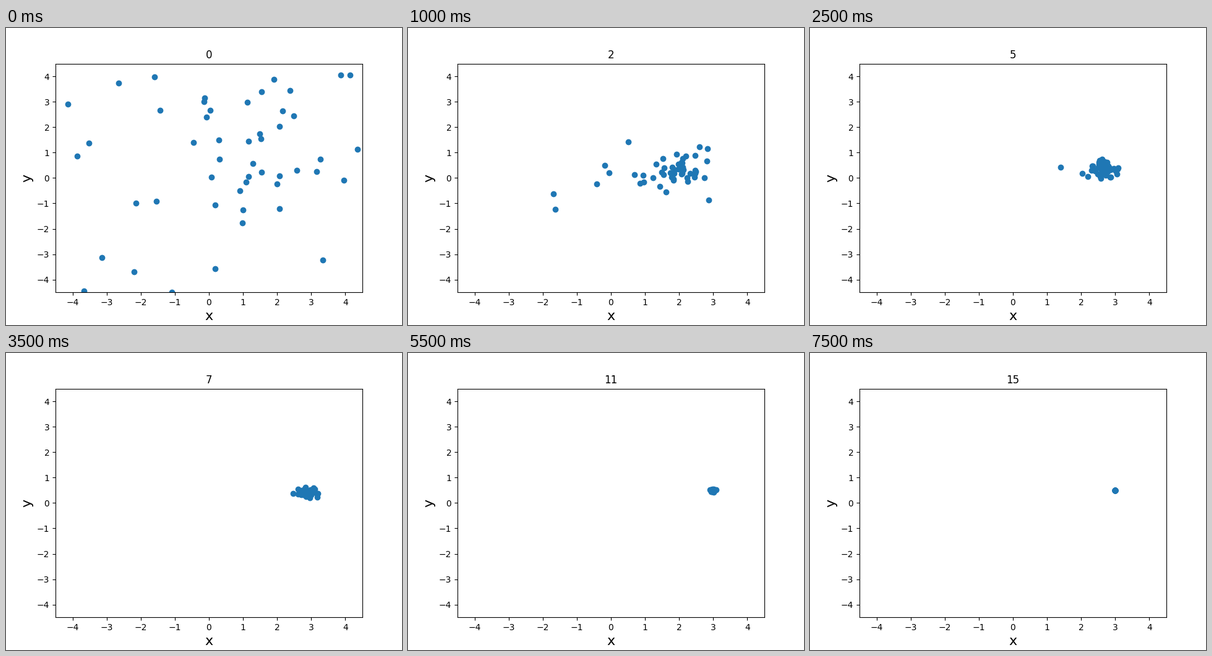
A matplotlib script that plays this animation: 640x480 px, repeating every 8 s.

```python
import numpy as np
import matplotlib.pyplot as plt
from matplotlib.animation import FuncAnimation

W, H, DPI = 640, 480, 100
LIMIT = 4.5
COUNT = 50
STEPS = 16

# Stage positions in pixels
BEST = np.array([442, 239])
OPTIMUM = np.array([493, 222])
RIM = np.array([
    (100, 123), (134, 186), (115, 207), (182, 89), (240, 79), (320, 119),
    (433, 83), (541, 76), (556, 76), (568, 196), (546, 246), (512, 375),
    (338, 389), (268, 427), (207, 394), (155, 371), (126, 425)])

rng = np.random.default_rng(7)
inner = COUNT - len(RIM) - 1
fill = np.c_[rng.triangular(190, 430, 520, inner), rng.uniform(100, 320, inner)]
start = np.vstack([BEST, RIM, fill])

# Each particle is pulled in at its own pace, faster along y than along x
pace = rng.uniform((0.12, 0.35), (0.95, 1.05), (COUNT, 2))
wobble = rng.normal(0, (24, 15), (STEPS, COUNT, 2))


def positions(step):
    """Swarm contracting onto a best point that itself moves to the optimum."""
    center = OPTIMUM + (BEST - OPTIMUM) * np.exp(-(step / 4.8) ** 2)
    pull = np.exp(-pace * step ** 1.5)
    unrest = (1 - np.exp(-step)) * (1 - step / (STEPS - 1)) ** 2
    return center + (start - BEST) * pull + wobble[step] * unrest


fig, ax = plt.subplots(figsize=(W / DPI, H / DPI), dpi=DPI)
ax.set_xlim(-LIMIT, LIMIT)
ax.set_ylim(-LIMIT, LIMIT)
ax.set_xlabel("x", fontsize=16)
ax.set_ylabel("y", fontsize=16)
title = ax.set_title("0")
dots = ax.scatter([], [], color="tab:blue")


def to_data(pts):
    return ax.transData.inverted().transform(np.c_[pts[:, 0], H - pts[:, 1]])


def update(step):
    dots.set_offsets(to_data(positions(step)))
    title.set_text(str(step))
    return dots, title


anim = FuncAnimation(fig, update, frames=STEPS, interval=500, repeat=True, repeat_delay=0)
plt.show()
```
